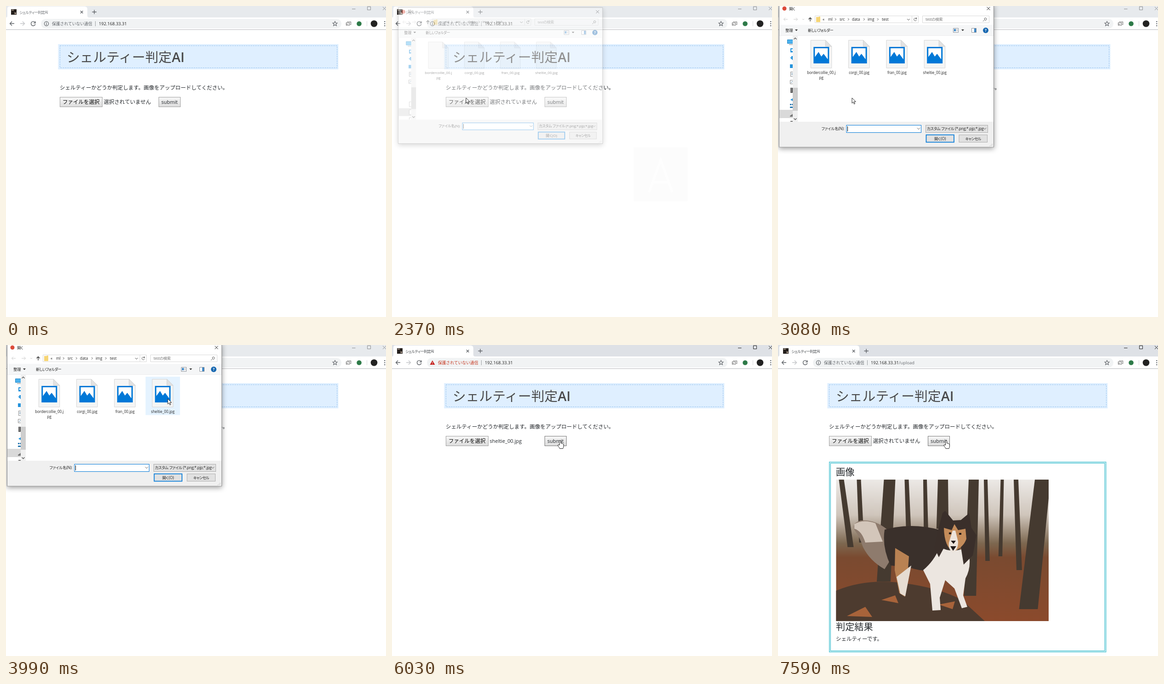
Animation, 827 px wide and 677 px high, one loop 8 s. Source, as an HTML page:

```html
<!DOCTYPE html>
<html lang="ja">
<head>
<meta charset="utf-8">
<title>シェルティー判定AI</title>
<style>
html, body { margin: 0; width: 100%; height: 100%; overflow: hidden; background: #fff; }
svg { display: block; width: 827px; height: 677px; }
text { white-space: pre; }
.body { font: 350 11.52px 'Noto Sans CJK JP', 'Noto Sans', sans-serif; fill: #212529; }
.latin { font: 11px 'Open Sans', sans-serif; fill: #212529; }
.head { font: 300 28.8px 'Noto Sans CJK JP', sans-serif; fill: #494949; }
.sub { font: 350 20.16px 'Noto Sans CJK JP', sans-serif; fill: #212529; }
.ui { font: 8.4px 'Open Sans', 'Noto Sans CJK JP', sans-serif; font-feature-settings: 'palt'; fill: #222; }
.tight { letter-spacing: -.7px; }
.name { font-size: 8.1px; }
.mid { text-anchor: middle; }
.line { fill: none; stroke: #5f6368; stroke-width: 1.4; }
.thin { fill: none; stroke: #555; stroke-width: 1; }
#dialog { filter: drop-shadow(0 3px 6px rgba(0,0,0,.4)); }
</style>
</head>
<body>
<svg viewBox="0 0 827 677">
<defs>
  <linearGradient id="face" x2="0" y2="1"><stop stop-color="#f7f7f7"/><stop offset="1" stop-color="#dcdcdc"/></linearGradient>
  <linearGradient id="faceDown" x2="0" y2="1"><stop stop-color="#d8d8d8"/><stop offset="1" stop-color="#ececec"/></linearGradient>
  <linearGradient id="forest" x2="0" y2="1">
    <stop stop-color="#ece9e6"/><stop offset=".25" stop-color="#cfc5bb"/><stop offset=".45" stop-color="#7d6850"/>
    <stop offset=".55" stop-color="#7a4a30"/><stop offset="1" stop-color="#8b4a2c"/>
  </linearGradient>
  <clipPath id="photoClip"><rect x="126.5" y="293" width="462.5" height="308"/></clipPath>
  <clipPath id="navClip"><rect x="3" y="65" width="29" height="187"/></clipPath>
</defs>
<rect width="827" height="677" fill="#fff"/>

<g id="browser">
  <rect id="strip" width="827" height="25"/>
  <path d="M0 25Q3 25 3 21V6Q3 1 8 1H171Q177 1 177 7V21Q177 25 181 25Z" fill="#fff"/>
  <g id="favicon"><rect x="11" y="7" width="12" height="12" fill="#241f1c"/><path d="M12 8H17V10H12ZM18 14H22V18H19Z" fill="#9a8c80"/></g>
  <path id="spinner" d="M17 8A5 5 0 1 1 12 13" fill="none" stroke-width="1.6"/>
  <text class="ui tight" x="29" y="16.5" id="tabTitle">シェルティー判定AI</text>
  <path class="line" d="M162 10.5L167.5 16M167.5 10.5L162 16M187.500 13H197M192.200 8.500V17.500"/>
  <path id="controls" d="M753 6.500H760.500M786.500 1.500H793.500V8.500H786.500ZM820 2L827 9M827 2L820 9" fill="none"/>
  <path d="M0 51.500H827" stroke="#b5b7ba"/>
  <path class="line" d="M18 38.300H8.500M13 33.800L8.500 38.300L13 42.800"/>
  <path class="line" d="M31 38.300H40.500M36 33.800L40.500 38.300L36 42.800" style="stroke:#c4c6c9"/>
  <path class="line" d="M63 35.500A4.700 4.700 0 1 0 63.800 39.500M64 33.500V37H60.300"/>
  <rect x="76" y="28" width="654" height="21" rx="10.500" fill="#f1f3f4"/>
  <g id="info"><circle class="line" cx="88" cy="38.500" r="4.600" style="stroke-width:1.200"/><path class="line" d="M88 37.800V41.200M88 35.500V36.700"/></g>
  <g id="warn"><path d="M88 33.500L93.500 43H82.500Z" fill="#c5221f"/><path d="M88 36.800V39.800M88 40.700V41.900" stroke="#fff"/></g>
  <text class="ui" x="100" y="41.800" id="security" style="font-size:8.800px;font-feature-settings:normal">保護されていない通信</text>
  <path d="M194.500 33V44" stroke="#9a9da1"/>
  <text class="ui" x="202" y="41.800" style="font-size:9.400px">192.168.33.31<tspan id="urlPath" fill="#666a6e">/upload</tspan></text>
  <path class="line" d="M716 33.500L717.500 37H721L718.300 39.400L719.200 43L716 41L712.800 43L713.700 39.400L711 37H714.500Z" style="stroke-width:1.100"/>
  <path class="line" d="M742.500 35V34.500H750.500V40.500H749M740.500 36.500H747.500V42H740.500ZM741 40H745" style="stroke:#777;stroke-width:1.200"/>
  <circle cx="768.500" cy="38.500" r="5.300" fill="#2d7a48"/>
  <path d="M785.500 33V44" stroke="#d5d7da"/>
  <circle cx="801" cy="38.500" r="7.300" fill="#222"/>
  <path d="M823 34H825.300M823 38.500H825.300M823 43H825.300" stroke="#5f6368" stroke-width="2.200"/>
</g>

<g id="page">
  <rect x="113.400" y="83" width="610" height="55" fill="#dfefff"/>
  <rect x="117.500" y="86.500" width="603" height="48" fill="none" stroke="#96c2ed" stroke-dasharray="3 2"/>
  <text class="head" x="132" y="122">シェルティー判定<tspan style="font-family:'Open Sans',sans-serif;font-weight:600">AI</tspan></text>
  <text class="body" x="117" y="182">シェルティーかどうか判定します。画像をアップロードしてください。</text>
  <rect id="fileBtn" x="117.500" y="198.500" width="92" height="21"/>
  <text class="body" x="123" y="213.200" style="fill:#000">ファイルを選択</text>
  <text class="body" id="noFile" x="212.500" y="213.200">選択されていません</text>
  <text class="latin" id="chosen" x="212.500" y="213">sheltie_00.jpg</text>
  <rect id="submitBtn" x="332.500" y="198.500" width="47" height="21"/>
  <text class="latin" x="338" y="213">submit</text>
</g>

<g id="result">
  <rect x="111.700" y="254.700" width="602" height="413.600" fill="none" stroke="#4ec4d3" stroke-width="1.400"/>
  <rect x="114.300" y="257.300" width="596.800" height="408.400" fill="none" stroke="#4ec4d3" stroke-width="1.400"/>
  <text class="sub" x="126" y="284">画像</text>
  <g clip-path="url(#photoClip)">
    <rect x="126" y="293" width="463" height="308" fill="url(#forest)"/>
    <g id="trunks" fill="#453a30"></g>
    <path d="M126 535Q190 508 270 518T400 555L450 601H126Z" fill="#4d3b2f"/>
    <path d="M150 590L190 570L205 592ZM225 555L255 545L262 562ZM350 565L385 558L380 575Z" fill="#a8633a"/>
    <path d="M238 402Q212 380 180 382Q160 388 166 402Q178 418 185 440Q200 470 232 488L262 440Z" fill="#8e7b6d"/>
    <path d="M166 390Q185 378 212 388L228 428L190 430Q182 404 166 400Z" fill="#d3c6ba"/>
    <path d="M232 402Q290 386 350 402L400 430L380 482Q330 500 285 484L245 480Q226 440 232 402Z" fill="#3a302b"/>
    <path d="M255 442L285 460L282 500L276 548L264 540L254 490Z" fill="#b98253"/>
    <path d="M258 505L290 480L277 547L266 541Z" fill="#e6dcd2"/>
    <path d="M352 440Q380 455 412 440Q424 480 408 508L403 545L412 570L400 573L384 530L364 512L352 550L354 577L336 578L331 520L316 490Q340 470 352 440Z" fill="#ece6e0"/>
    <path d="M348 404L358 366L364 361L381 382L398 381L416 366L421 398L432 414L424 458L404 478L398 440H362L350 462L340 440Z" fill="#3a2f2a"/>
    <path d="M361 398L378 403L384 390L392 403L408 400L410 422Q404 440 382 450Q362 440 361 398Z" fill="#c48c5a"/>
    <path d="M380 404H386L392 428Q392 446 381 452Q370 446 372 430Z" fill="#ede4db"/>
    <path d="M376 426H387L382 433ZM372 408H377V412H372ZM394 409H399V413H394ZM375 438H388L381 448Z" fill="#211a18"/>
  </g>
  <text class="sub" x="126" y="621">判定結果</text>
  <text class="body" x="126" y="643.500">シェルティーです。</text>
</g>

<g id="dialog">
  <rect x="2.500" y="-4" width="467" height="311" fill="#fff" stroke="#8a8a8a"/>
  <circle cx="14" cy="5.500" r="4.500" fill="#dc4a38"/>
  <text class="ui tight" x="24" y="8.500">開く</text>
  <path class="thin" d="M454.500 2L461.500 9M461.500 2L454.500 9" style="stroke:#222"/>
  <path class="thin" d="M21 29H12.500M16 25.500L12.500 29L16 32.500M34 29H42.500M39 25.500L42.500 29L39 32.500M53 28L55 30L57 28" style="stroke:#ccc"/>
  <path class="thin" d="M70 33.500V25.500M66.500 29L70 25.500L73.500 29" style="stroke:#333;stroke-width:1.300"/>
  <path d="M80.500 21.500H291.500V36.500H80.500ZM291.500 21.500H305.500V36.500H291.500M314.500 21.500H459.500V36.500H314.500Z" fill="none" stroke="#d9d9d9"/>
  <path d="M83 24H88L89 23H92V35H83Z" fill="#f6d576"/>
  <g id="crumbs"></g>
  <path class="thin" d="M281 28L284 31L287 28M301 27.200A3 3 0 1 0 301.500 30.500M301.500 25V28H299"/>
  <text class="ui" x="321" y="32" style="fill:#777;letter-spacing:-.3px">testの検索</text>
  <path class="thin" d="M446 33.500L449 30.500M449 28A2.500 2.500 0 1 1 450.500 30.800Z"/>
  <path d="M3 41H469V64H3Z" fill="#f5f6f7"/><path d="M3 64.500H469" stroke="#ececee"/>
  <text class="ui" x="16" y="56">整理</text>
  <text class="ui tight" x="65" y="56">新しいフォルダー</text>
  <path d="M37 51H43L40 54.500ZM399 51H405L402 54.500Z" fill="#333"/>
  <path d="M381.500 48.500H392.500V57.500H381.500ZM421.500 48.500H431.500V57.500H421.500Z" fill="#fff" stroke="#8a9099"/>
  <path d="M383 50H387V55H383ZM427 49H431V57H427Z" fill="#3b87c8"/><path d="M388 51.500H391M388 54H391" stroke="#999"/>
  <circle cx="452" cy="53" r="6" fill="#1767b0"/>
  <text class="ui mid" x="452" y="56.200" style="fill:#fff;font-weight:700">?</text>
  <g clip-path="url(#navClip)">
    <path d="M3 226H32V244H3Z" fill="#d9d9d9"/>
    <path d="M20.500 73.500H33V81.500H20.500Z" fill="#4cb2ee" stroke="#1d83c4"/><path d="M24 84H32" stroke="#777"/>
    <path d="M27 92H32V101H27ZM26 112H29V109H32V118ZM26 127H32V135H26Z" fill="#2593dc"/><path d="M29 94H32V98H29Z" fill="#fff"/>
    <path d="M27.500 143.500H33V153.500H27.500ZM26.500 161.500H33V169.500H26.500Z" fill="#fff" stroke="#8c8c8c"/><path d="M29 146.500H32M29 149.500H32M28 167L32 164" stroke="#4b7594"/>
    <g id="navEarly" fill="#fff" stroke="#aaa"><path d="M27.500 211.500H33V222.500H27.500ZM27.500 229.500H33V240.500H27.500ZM27.500 247.500H33V255H27.500Z"/></g>
    <g id="navLate"><path d="M27 178H32V189H27Z" fill="#555"/><path d="M28 180H30M28 183H30M28 186H30" stroke="#ddd"/><path d="M27 204L32 201V207Z" fill="#2593dc"/><path d="M26 213H29V216H26ZM30 213H32V216H30ZM26 219H32V222H26Z" fill="#2878b0"/><path d="M26 239L32 235V241H26ZM27 250H32V253H27Z" fill="#777"/></g>
  </g>
  <path d="M32 65H43V252H32Z" fill="#f0f0f0"/><path d="M32 178H43V228H32Z" fill="#cdcdcd"/>
  <path class="thin" d="M34.500 72.500L37.500 69.500L40.500 72.500M34.500 244.500L37.500 247.500L40.500 244.500" style="stroke-width:1.300"/>
  <g id="files"></g>
  <path d="M3 252H469V306.500H3Z" fill="#f0f0f0"/>
  <text class="ui" x="144.500" y="270" text-anchor="end" style="letter-spacing:-.1px">ファイル名(N):</text>
  <rect x="149" y="259.500" width="162.500" height="16" fill="#fff" stroke="#0078d7"/>
  <rect id="nameMark" x="151" y="261.500" width="53" height="11.500" fill="#0078d7"/>
  <text class="ui name" id="nameText" x="151.500" y="270.200">sheltie_00.jpg</text>
  <path id="caret" d="M151.500 262V273" stroke="#000"/>
  <rect id="combo" x="321.500" y="259.500" width="135" height="16"/>
  <text class="ui" x="324" y="270" style="letter-spacing:-.25px">カスタム ファイル (*.png;*.pjp;*.jpg</text>
  <path class="thin" d="M303 265.500L306 268.500L309 265.500M447 265.500L450 268.500L453 265.500"/>
  <rect id="openBtn" x="322.500" y="280.500" width="60.500" height="16" stroke="#0078d7"/>
  <text class="ui mid" x="352.700" y="291.500">開く(O)</text>
  <rect x="394" y="280.500" width="61.500" height="16" fill="#e1e1e1" stroke="#adadad"/>
  <text class="ui tight mid" x="424.700" y="291.500">キャンセル</text>
  <path d="M466 300V305M463.500 302.500V305M461 304V305" stroke="#b5b5b5" stroke-dasharray="1.500 1"/>
</g>

<g id="inputMode">
  <rect x="526" y="308" width="117.500" height="117" fill="#4d4d4d"/>
  <path d="M559.500 405.500L584.800 335L610 405.500M568 383.500H601.500" fill="none" stroke="#e6e6e6" stroke-width="5.300"/>
</g>
<g id="cursor" fill="#fff" stroke="#111" stroke-width=".9">
  <path id="arrow" d="M0 0V11.500L2.700 9L4.600 13.500L6.500 12.700L4.600 8.300H8.300Z"/>
  <path id="hand" d="M-1.500 10V1.200Q-1.500 0 0 0Q1.500 0 1.500 1.200V6Q3 5 4 6.500Q5.500 6 6 7.500Q7.500 7 7.500 9V13Q7 15 6 17.500H-1Q-2 15 -5 11Q-5 8.800 -3.500 9Z"/>
</g>
</svg>
<script>
const LOOP = 8000;
const PICKED = 4240, CLOSING = 5090, CLOSED = 5330, CHOSEN = 5490;
const LOADING = 6660, RESULT = 7140, LOADED = 7590;
const el = {};
document.querySelectorAll('[id]').forEach(node => el[node.id] = node);

const show = (node, on) => node.setAttribute('visibility', on ? 'inherit' : 'hidden');
const paint = (node, fill, stroke, width = 1) => {
  node.setAttribute('fill', fill);
  node.setAttribute('stroke', stroke);
  node.setAttribute('stroke-width', width);
};
const ramp = (t, a, b) => Math.min(1, Math.max(0, (t - a) / (b - a)));
const smooth = p => p * p * (3 - 2 * p);
const inside = ([x, y], l, t, r, b) => x >= l && x < r && y >= t && y < b;

// top x, bottom x, width, bottom y
const trunks = [[138, 158, 11, 440], [176, 182, 9, 430], [243, 230, 25, 515], [280, 284, 9, 400],
  [320, 322, 8, 400], [359, 358, 22, 400], [426, 418, 22, 546], [452, 456, 8, 470],
  [488, 484, 7, 460], [518, 525, 10, 490], [576, 545, 34, 575]];
el.trunks.innerHTML = trunks.map(([a, b, w, y]) =>
  `<path d="M${a - w / 2} 293H${a + w / 2}L${b + w * .6} ${y}H${b - w * .6}Z"/>`).join('');

const crumbs = [['«', 97], ['ml', 109], ['src', 134], ['data', 161], ['img', 195], ['test', 226]];
el.crumbs.innerHTML = crumbs.map(([label, x]) => `<text class="ui" x="${x}" y="31.500">${label}</text>`).join('') +
  [125, 153, 187, 217].map(x => `<path class="thin" d="M${x - 1} 26.500L${x + 1.500} 29L${x - 1} 31.500"/>`).join('');

const names = [['bordercollie_00.j', 'pg'], ['corgi_00.jpg'], ['fran_00.jpg'], ['sheltie_00.jpg']];
const centre = i => 94.3 + i * 82.3;
el.files.innerHTML = names.map((lines, i) => `<g transform="translate(${centre(i)})">
  <rect class="back" x="-37.500" y="69" width="75" height="83.500"/>
  <path d="M-23 74.500H9L22.500 88V135H-23Z" fill="#f5f5f5" stroke="#d4d4d4"/>
  <path d="M9 74.500V88H22.500Z" fill="#e2e2e2" stroke="#d0d0d0"/>
  <g class="thumb"><path d="M-17 89H17V125H-17Z" fill="#0078d7"/><path d="M-14 92H14V116L5 104L0 110L-6 100L-14 111Z" fill="#fff"/></g>
  ${lines.map((s, n) => `<text class="ui name mid" y="${148 + n * 10.800}">${s}</text>`).join('')}</g>`).join('');
const backs = [...document.querySelectorAll('.back')];
const thumbs = [...document.querySelectorAll('.thumb')];

// start, end, steps, from x y, to x y
const moves = [
  [340, 1120, 11, 762, 668, 196, 235],
  [1200, 1440, 4, 196, 235, 166, 192],
  [1590, 1670, 2, 166, 192, 161, 200],
  [3380, 3990, 9, 161, 200, 352, 117],
  [4320, 5010, 10, 352, 117, 371, 284],
  [5490, 6030, 8, 371, 284, 366, 208]
];
function pointer(t) {
  const move = moves.filter(m => t >= m[0]).pop();
  if (!move) return [-50, -50];
  const [start, end, steps, x0, y0, x1, y1] = move;
  const p = smooth((Math.floor(ramp(t, start, end) * (steps - 1) + 1e-6) + 1) / steps);
  return [x0 + (x1 - x0) * p, y0 + (y1 - y0) * p];
}

function drawBrowser(t) {
  const active = t >= 2060 && t < 2290 || t >= CLOSED;
  const spinning = t >= LOADING && t < LOADED;
  const warned = t >= CLOSING && t < RESULT;
  el.strip.setAttribute('fill', active ? '#dee1e6' : '#e7eaed');
  el.controls.setAttribute('stroke', active ? '#222' : '#8d8f91');
  el.tabTitle.style.fill = active ? '#45494d' : '#6b6f73';
  show(el.favicon, !spinning);
  show(el.spinner, spinning);
  el.spinner.setAttribute('stroke', t < RESULT ? '#8a8d91' : '#1a73e8');
  el.spinner.setAttribute('transform', `rotate(${(t - LOADING) * (t < RESULT ? -.36 : .5)} 17 13)`);
  show(el.info, !warned);
  show(el.warn, warned);
  el.security.style.fill = warned ? '#c5361f' : '#5f6368';
  show(el.urlPath, t >= RESULT);
}

function drawPage(t, at, covered) {
  const done = t >= RESULT, picked = t >= CHOSEN && !done;
  const dx = done ? -6 : 0;
  const button = (node, over, down) =>
    paint(node, down ? 'url(#faceDown)' : 'url(#face)', over ? '#777' : '#a0a0a0');
  el.page.setAttribute('transform', `translate(${dx})`);
  button(el.fileBtn, !covered && inside(at, 117, 198, 210, 220), t >= 1990 && t < 2140);
  const overSubmit = !covered && inside(at, 332 + dx, 198, 380 + dx, 220);
  button(el.submitBtn, overSubmit, t >= LOADING && t < LOADING + 80);
  show(el.noFile, !picked);
  show(el.chosen, picked);
  show(el.result, done);
  show(el.hand, overSubmit);
  show(el.arrow, !overSubmit);
}

function drawDialog(t, at) {
  const opening = smooth(ramp(t, 2250, 2530));
  const step = Math.floor((t - CLOSING) / 80);
  let opacity = Math.min(opening, t < 2750 ? .97 : 1), scale = .92 + .08 * opening;
  if (step >= 0) {
    opacity = [.9, .73, .3][step] || 0;
    scale = [.996, .987, .96][step] || .95;
  }
  const open = t >= 2290 && t < CLOSED;
  show(el.dialog, open);
  if (!open) return;
  el.dialog.setAttribute('opacity', opacity);
  el.dialog.setAttribute('transform', `translate(236 153) scale(${scale}) translate(-236 -153)`);

  const picked = t >= PICKED, marked = t >= 5010;
  backs.forEach((back, i) => {
    const x = centre(i), over = inside(at, x - 37.5, 69, x + 37.5, 152);
    const chosen = picked && i === 3;
    paint(back, chosen ? (marked ? '#d9d9d9' : '#cce8ff') : over ? '#e5f3ff' : 'none',
      chosen && over ? '#99d1ff' : 'none');
  });
  thumbs.forEach((thumb, i) => show(thumb, t >= 2800 + i * 75));
  show(el.navEarly, t < 2830);
  show(el.navLate, t >= 2830);
  show(el.nameText, picked);
  show(el.nameMark, marked);
  el.nameText.style.fill = marked ? '#fff' : '#222';
  show(el.caret, !picked && (t < 2620 || Math.floor((t - 2620) / 530) % 2 === 0));
  const overCombo = inside(at, 321, 259, 457, 276), overOpen = inside(at, 322, 280, 383, 297);
  paint(el.combo, overCombo ? '#e5f1fb' : '#e1e1e1', overCombo ? '#0078d7' : '#adadad');
  paint(el.openBtn, overOpen ? '#d5eafa' : '#e1e1e1', '#0078d7', overOpen ? 1 : 1.7);
}

function render(t) {
  const at = pointer(t);
  drawBrowser(t);
  drawPage(t, at, t >= 2290 && t < CLOSED);
  drawDialog(t, at);
  el.inputMode.setAttribute('opacity', ramp(t, 2370, 2450) * (1 - ramp(t, 2760, 3060)));
  el.cursor.setAttribute('transform', `translate(${at})`);
}

const began = performance.now();
function tick() {
  render((performance.now() - began) % LOOP);
  requestAnimationFrame(tick);
}
tick();
</script>
</body>
</html>
```
